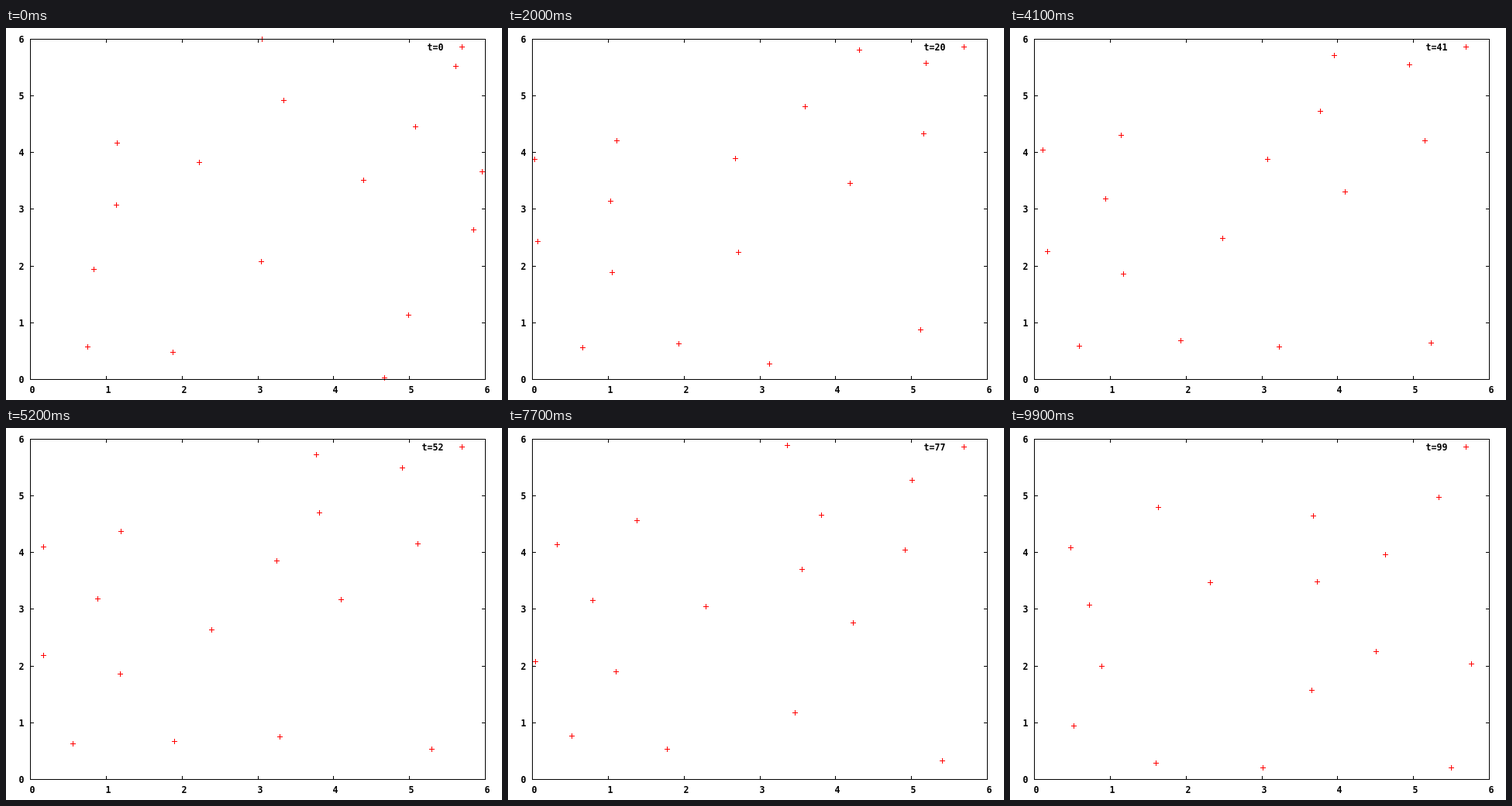
Animation, 640 px wide and 480 px high, one loop 10000 ms. Source, as an HTML page:

```html
<!DOCTYPE html>
<html lang="en">
<head>
<meta charset="utf-8">
<title>Particles in a periodic box</title>
<style>
  html, body { margin: 0; width: 100%; height: 100%; overflow: hidden; background: #fff; }
  svg { display: block; width: 640px; height: 480px; }
  path { fill: none; stroke: #000; shape-rendering: crispEdges; }
  #points { stroke: #f00; }
  text { font: bold 11.63px "DejaVu Sans Mono", monospace; text-anchor: middle; }
  #legend { text-anchor: end; }
</style>
</head>
<body>
<svg viewBox="0 0 640 480">
  <path id="points"/>
  <path id="axes"/>
  <g id="labels"></g>
  <text id="legend" x="564.5" y="29"></text>
</svg>
<script>
const STEP = 100, STEPS = 100;
const LEFT = 31, TOP = 14, W = 587, H = 439, BOTTOM = TOP + H;
const MID = 52, END = 99;
const $ = id => document.getElementById(id);

// Each particle bends from its start through a middle point to its end.
// Points may lie past the box edges; they are wrapped when drawn.
const particles = [
  '330,453 353,398 389,338',
  '358,93 404,109 391,113',
  '580,49 511,51 553,89',
  '528,127 531,149 484,163',
  '143,148 148,133 191,102',
  '249,173 349,171 396,198',
  '461,196 432,221 472,288',
  '614,185 635,153 665,154',
  '142,228 118,220 102,228',
  '603,260 635,293 595,304',
  '113,311 147,317 118,307',
  '329,301 265,260 258,199',
  '105,411 86,407 82,384',
  '215,418 217,404 188,432',
  '519,370 549,414 569,438',
  '488,12 400,34 326,-1',
].map(path => path.split(' ').map(point => point.split(',').map(Number)));

// Parabola with the given values at times 0, MID and END
const bend = (a, b, c, t) =>
  a * (t - MID) * (t - END) / (MID * END) +
  b * t * (END - t) / (MID * (END - MID)) +
  c * t * (t - MID) / (END * (END - MID));

const wrap = (v, min, size) => min + ((Math.round(v) - min) % size + size) % size;
const plus = (x, y) => `M${x - 3} ${y + .5}h7M${x + .5} ${y - 3}v7`;

function place([a, b, c], t) {
  const x = bend(a[0], b[0], c[0], t), y = bend(a[1], b[1], c[1], t);
  return plus(wrap(x, LEFT, W), wrap(y, TOP, H));
}

function drawAxes() {
  let d = `M${LEFT + .5} ${TOP + .5}h${W}v${H}h${-W}z`;
  let labels = '';
  for (let v = 0; v <= 6; v++) {
    const x = LEFT + Math.round(v * W / 6);
    const y = BOTTOM - Math.round(v * H / 6);
    d += `M${x + .5} ${BOTTOM}v-4M${x + .5} ${TOP + 1}v4`;
    d += `M${LEFT + 1} ${y + .5}h4M${LEFT + W} ${y + .5}h-4`;
    labels += `<text x="${x + 3}" y="471">${v}</text><text x="20" y="${y + 5}">${v}</text>`;
  }
  $('axes').setAttribute('d', d);
  $('labels').innerHTML = labels;
}

const start = performance.now();
let shown = -1;

function frame() {
  const t = Math.floor((performance.now() - start) / STEP) % STEPS;
  if (t !== shown) {
    shown = t;
    $('points').setAttribute('d', plus(588, 24) + particles.map(p => place(p, t)).join(''));
    $('legend').textContent = `t=${t}`;
  }
  requestAnimationFrame(frame);
}

drawAxes();
frame();
</script>
</body>
</html>
```
